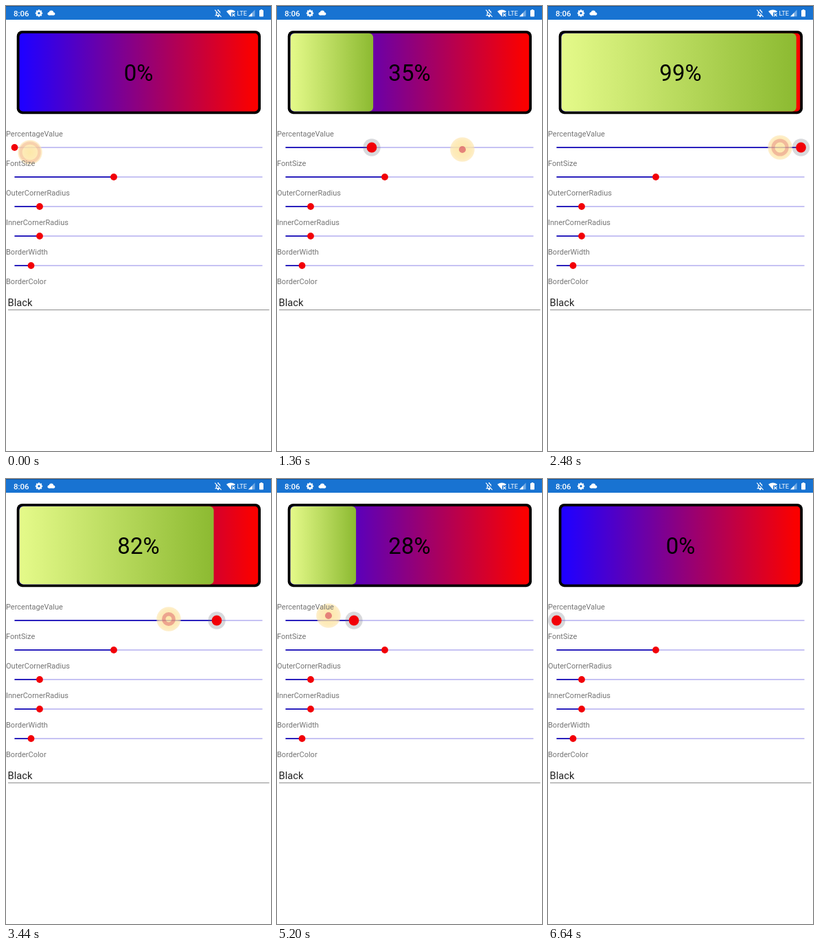
These frames come from a looping animation (386x648 px, 6720 ms). An HTML page with a canvas:

```html
<!DOCTYPE html>
<html lang="en">
<head>
<meta charset="utf-8">
<title>Progress bar sliders</title>
<style>
html, body { margin: 0; width: 100%; height: 100%; overflow: hidden; background: #fff; }
#stage { position: relative; width: 386px; height: 648px; overflow: hidden; font-family: Roboto, sans-serif; }
canvas { position: absolute; left: 0; top: 0; }
/* zero line height: "top" is the middle of the capitals */
span { position: absolute; line-height: 0; white-space: nowrap; }
.label { left: 0; font-size: 11px; color: #757575; }
.bar { color: #fff; }
#percent { left: 0; width: 386px; top: 97.5px; text-align: center; font-size: 33px; color: #000; }
</style>
</head>
<body>
<div id="stage">
  <canvas id="view" width="386" height="648"></canvas>
  <span class="bar" style="left:11px;top:11px;font-size:11.5px;font-weight:500">8:06</span>
  <span class="bar" style="left:336.5px;top:11px;font-size:9.3px">LTE</span>
  <span id="percent">0%</span>
  <span class="label" style="top:186.5px">PercentageValue</span>
  <span class="label" style="top:229.5px">FontSize</span>
  <span class="label" style="top:272.5px">OuterCornerRadius</span>
  <span class="label" style="top:315.5px">InnerCornerRadius</span>
  <span class="label" style="top:358.5px">BorderWidth</span>
  <span class="label" style="top:401.5px">BorderColor</span>
  <span style="left:2.5px;top:432px;font-size:14.7px;color:#212121">Black</span>
</div>
<script>
const ctx = document.getElementById('view').getContext('2d');
const percent = document.getElementById('percent');

const LOOP = 6720, STEP = 80;
const LAG = 600;          // the slider trails the finger
const TOUCH_END = 6160;
const X0 = 12.5, X1 = 373.5;

// [time, value]
const touchX = [[0, 35], [760, 138], [1360, 270], [1880, 368.5], [2080, 374], [2280, 366],
  [2480, 338], [2840, 307], [3440, 237], [3640, 213], [4240, 149], [4600, 112],
  [5200, 75], [5760, 26], [6040, 12.5], [6720, 12.5]];
const touchY = [[0, 213], [1360, 209], [2480, 206], [3440, 204], [4240, 203], [5200, 199], [6100, 206]];
const pulse = [[0, 0.88], [1360, 2.28], [2480, 3.7], [3440, 4.55], [4240, 4.97], [5200, 6.28], [6160, 7.2]];

function segment(keys, t) {
  let i = 0;
  while (i < keys.length - 2 && t >= keys[i + 1][0]) i++;
  return i;
}

function linear(keys, t) {
  const i = segment(keys, t), [a, va] = keys[i], [b, vb] = keys[i + 1];
  return va + (vb - va) * Math.min(1, (t - a) / (b - a));
}

// monotone tangent: harmonic mean of neighbouring slopes
function tangent(keys, i) {
  const slope = j => (keys[j + 1][1] - keys[j][1]) / (keys[j + 1][0] - keys[j][0]);
  if (i === 0) return slope(0);
  if (i === keys.length - 1) return slope(i - 1);
  const p = slope(i - 1), q = slope(i);
  return p * q > 0 ? 2 * p * q / (p + q) : 0;
}

function smooth(keys, t) {
  const i = segment(keys, t), [a, va] = keys[i], [b, vb] = keys[i + 1];
  const h = b - a, u = (t - a) / h, w = 1 - u;
  return va * (1 + 2 * u) * w * w + tangent(keys, i) * h * u * w * w
    + vb * u * u * (3 - 2 * u) - tangent(keys, i + 1) * h * u * u * w;
}

function disc(x, y, r, color) {
  ctx.fillStyle = color;
  ctx.beginPath();
  ctx.arc(x, y, r, 0, Math.PI * 2);
  ctx.fill();
}

function roundBox(x, y, w, h, r, fill) {
  ctx.fillStyle = fill;
  ctx.beginPath();
  ctx.roundRect(x, y, w, h, r);
  ctx.fill();
}

function poly(points, color) {
  ctx.fillStyle = color;
  ctx.beginPath();
  points.forEach(([x, y]) => ctx.lineTo(x, y));
  ctx.fill();
}

function line(x, y, x2, y2, width, color) {
  ctx.strokeStyle = color;
  ctx.lineWidth = width;
  ctx.beginPath();
  ctx.moveTo(x, y);
  ctx.lineTo(x2, y2);
  ctx.stroke();
}

function gradient(x, x2, from, to) {
  const g = ctx.createLinearGradient(x, 0, x2, 0);
  g.addColorStop(0, from);
  g.addColorStop(1, to);
  return g;
}

function drawStatus() {
  const blue = '#1873d2', white = '#fff';
  ctx.fillStyle = blue;
  ctx.fillRect(0, 0, 386, 20);
  ctx.fillStyle = '#0f559f';
  ctx.fillRect(0, 0, 386, 1);
  // gear
  for (let i = 0; i < 4; i++) {
    const dx = Math.cos(i * Math.PI / 4) * 5.2, dy = Math.sin(i * Math.PI / 4) * 5.2;
    line(48 - dx, 10.5 - dy, 48 + dx, 10.5 + dy, 2.2, white);
  }
  disc(48, 10.5, 4.1, white);
  disc(48, 10.5, 1.7, blue);
  // cloud
  disc(62.8, 11.2, 2.3, white);
  disc(66, 9.8, 3.2, white);
  disc(69.3, 11.4, 2.1, white);
  ctx.fillRect(62.8, 10.8, 6.5, 2.7);
  // muted bell
  roundBox(305.8, 6.5, 6.4, 7.5, [3.2, 3.2, 0, 0], white);
  roundBox(307, 7.7, 4, 5.4, [2, 2, 0, 0], blue);
  line(304.5, 13.7, 313.5, 13.7, 1.2, white);
  line(309, 5, 309, 7, 1.5, white);
  disc(309, 15, 1.2, white);
  line(305.2, 5.2, 314.2, 15.2, 2.6, blue);
  line(304.2, 5.6, 313.6, 15.8, 1.1, white);
  // wifi
  ctx.fillStyle = white;
  ctx.beginPath();
  ctx.moveTo(327.5, 15.5);
  ctx.lineTo(321, 7.8);
  ctx.quadraticCurveTo(327.5, 3, 334, 7.8);
  ctx.fill();
  ctx.fillStyle = blue;
  ctx.fillRect(328, 9.5, 7, 7);
  line(329.2, 10.8, 333.4, 15, 1.2, white);
  line(333.4, 10.8, 329.2, 15, 1.2, white);
  // signal
  poly([[353, 15.3], [362.5, 5.5], [362.5, 15.3]], 'rgba(255,255,255,.4)');
  poly([[353, 15.3], [358.5, 9.7], [358.5, 15.3]], white);
  // battery
  roundBox(369, 6, 6, 9.5, 0.8, white);
  ctx.fillStyle = white;
  ctx.fillRect(370.7, 5, 2.6, 1.2);
}

function drawBar(value) {
  roundBox(15.7, 36, 355.3, 121.2, 8, '#000');
  roundBox(19.5, 39.7, 347.7, 113.8, 5, gradient(24, 360, '#2000ff', '#fa0000'));
  const w = 347 * value;
  if (w > 0.5) {
    roundBox(19.5, 39.7, w, 113.8, Math.min(6, w / 2),
      gradient(19.5, 19.5 + w, '#e5fa8a', '#8cba31'));
  }
}

function drawSlider(x, y, pressed) {
  line(X0, y, X1, y, 2, '#c6c2f3');
  if (x > X0) line(X0, y, x, y, 2, '#2a20bd');
  if (pressed) disc(x, y, 12.7, 'rgba(110,115,125,.27)');
  disc(x, y, pressed ? 7.4 : 4.9, '#f20008');
}

function drawTouch(t) {
  const x = smooth(touchX, t), y = linear(touchY, t);
  const glow = ctx.createRadialGradient(x, y, 0, x, y, 18);
  glow.addColorStop(0, 'rgba(252,226,150,.82)');
  glow.addColorStop(0.75, 'rgba(253,229,166,.76)');
  glow.addColorStop(1, 'rgba(253,226,165,.55)');
  disc(x, y, 17.8, glow);
  const p = linear(pulse, t) % 1;
  const r = 18 * p, hole = Math.max(0, (r - 6) * 1.15);
  ctx.fillStyle = `rgba(212,60,85,${0.05 + 0.75 * (1 - p)})`;
  ctx.beginPath();
  ctx.arc(x, y, r, 0, Math.PI * 2);
  ctx.arc(x, y, hole, 0, Math.PI * 2, true);
  ctx.fill();
}

function draw(t) {
  ctx.fillStyle = '#fff';
  ctx.fillRect(0, 0, 386, 648);
  drawStatus();

  const pressed = t >= LAG;
  const x = pressed ? Math.min(X1, Math.max(X0, smooth(touchX, t - LAG))) : X0;
  const value = (x - X0) / (X1 - X0);
  drawBar(value);
  percent.textContent = Math.round(value * 100) + '%';

  drawSlider(x, 206, pressed);
  drawSlider(157, 249, false);
  drawSlider(49, 292, false);
  drawSlider(49, 335, false);
  drawSlider(36.5, 378, false);
  line(3, 442.5, 383.5, 442.5, 1, '#8c8c8c');

  if (t < TOUCH_END) drawTouch(t);
}

const start = performance.now();
function tick() {
  const t = (performance.now() - start) % LOOP;
  draw(Math.floor(t / STEP) * STEP);
  requestAnimationFrame(tick);
}
tick();
</script>
</body>
</html>
```
